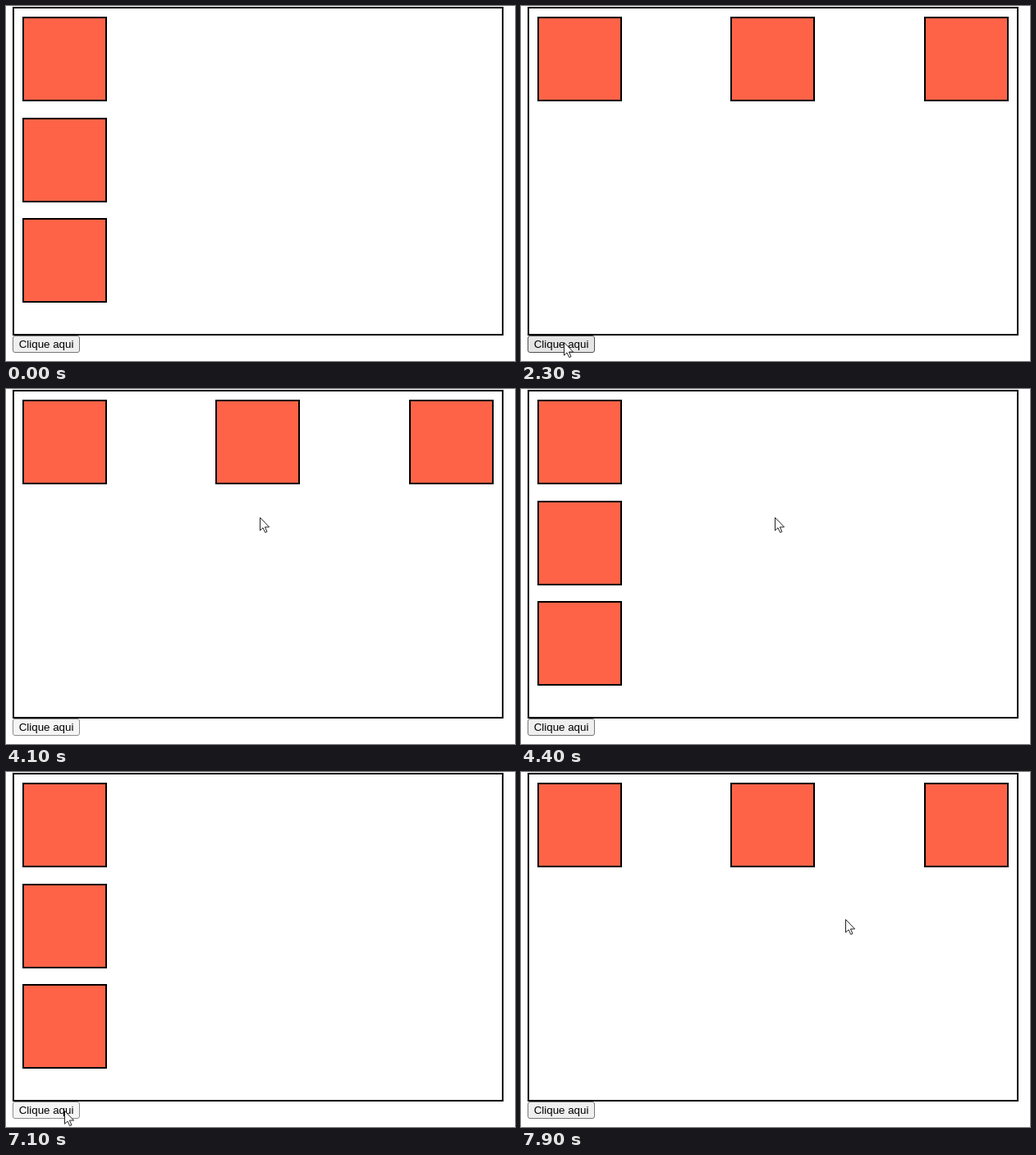
An HTML page that plays this animation: 620x432 px, repeating every 8 s.

```html
<!DOCTYPE html>
<html lang="pt">
<head>
<meta charset="utf-8">
<title>Clique aqui</title>
<style>
  html, body { margin: 0; width: 100%; height: 100%; overflow: hidden; background: #fff; }
  svg { display: block; width: 620px; height: 432px; }
  text { font: 13.33px "Liberation Sans", Arial, sans-serif; }
</style>
</head>
<body>
<svg viewBox="0 0 620 432">
  <rect x="9" y="2" width="596" height="398" fill="#fff" stroke="#000" stroke-width="2"/>
  <g id="boxes" fill="#ff6347" stroke="#000" stroke-width="2">
    <rect x="1" y="1" width="101" height="101"/>
    <rect x="1" y="1" width="101" height="101"/>
    <rect x="1" y="1" width="101" height="101"/>
  </g>
  <rect id="button" x="8.5" y="401.5" width="81" height="20" rx="2.5"/>
  <text x="15.7" y="416.4">Clique aqui</text>
  <path id="cursor" d="M.5 .5V16.2L4 12.9 6.7 18.6 9 17.6 6.4 12H11.6Z"
    fill="#fff" stroke="#222" stroke-linejoin="round"/>
</svg>
<script>
const LOOP = 8000, STEP = 100;
const boxes = [...document.querySelectorAll('#boxes rect')];
const button = document.getElementById('button');
const cursor = document.getElementById('cursor');

const point = (x, y) => ({ x, y });
const offstage = point(28, 440);
const firstClick = point(41, 412), secondClick = point(71, 412);
const right = point(373, 143), left = point(261, 150), rest = point(309, 156);
const arrive = point(79, 415), exit = point(395, 179);

const linear = k => k;
const smooth = k => k * k * (3 - 2 * k);
const middle = (a, b) => point((a.x + b.x) / 2, (a.y + b.y) / 2);

// Each move is a quadratic curve; a straight one bends through its middle
const move = (start, end, from, to, ease = linear, bend = middle(from, to)) =>
  ({ start, end, from, to, ease, bend });

const moves = [
  move(1200, 1500, offstage, firstClick),
  move(2200, 3100, firstClick, right, smooth, point(203, 366)),
  move(3100, 3500, right, left),
  move(3500, 3800, left, rest, smooth),
  move(4600, 5600, rest, arrive, smooth, point(340, 380)),
  move(5600, 6100, arrive, secondClick),
  move(7400, 7900, secondClick, exit, smooth)
];

const STYLES = {
  idle: ['#efefef', '#767676'],
  hover: ['#e5e5e5', '#4f4f4f'],
  active: ['#f5f5f5', '#8d8d8d']
};

const within = (v, a, b) => v >= a && v < b;

function cursorAt(t) {
  const { start, end, from, to, ease, bend } =
    moves.findLast(m => m.start <= t) || moves[0];
  const k = ease(Math.min(1, Math.max(0, (t - start) / (end - start))));
  const curve = axis => Math.round(
    (1 - k) ** 2 * from[axis] + 2 * k * (1 - k) * bend[axis] + k * k * to[axis]);
  return [curve('x'), curve('y')];
}

function place(el, x, y) {
  el.setAttribute('transform', `translate(${x} ${y})`);
}

function render(time) {
  // The screen refreshes ten times a second
  const t = Math.floor((time % LOOP) / STEP) * STEP;
  const row = within(t, 2000, 4400) || t >= 7200;
  boxes.forEach((box, i) => place(box,
    row ? Math.round(20 + i * 235.4) : 20,
    row ? 13 : Math.round(13 + i * 122.7)));

  const [x, y] = cursorAt(t);
  place(cursor, x, y);

  const pressed = within(t, 1900, 2000) || within(t, 4100, 4400) || within(t, 7100, 7200);
  const over = within(x, 8, 90) && within(y, 401, 422);
  const [fill, stroke] = STYLES[pressed ? 'active' : over ? 'hover' : 'idle'];
  button.setAttribute('fill', fill);
  button.setAttribute('stroke', stroke);
}

let start;
function tick(now) {
  start ??= now;
  render(now - start);
  requestAnimationFrame(tick);
}
render(0);
requestAnimationFrame(tick);
</script>
</body>
</html>
```
